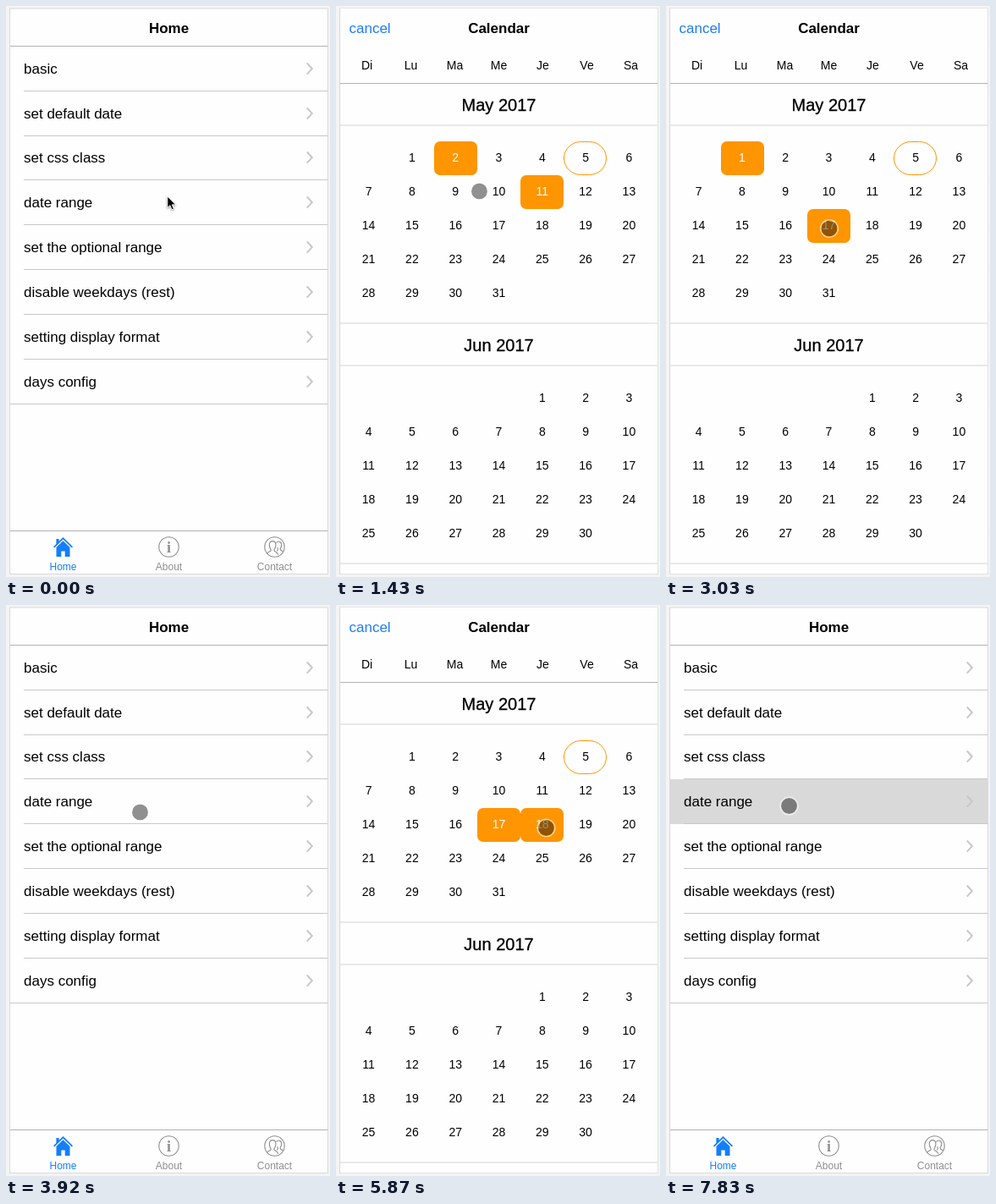
An HTML page for the animation above (8 s loop, 383 px wide and 675 px high).

```html
<!DOCTYPE html>
<html lang="en">
<head>
<meta charset="utf-8">
<title>Calendar range</title>
<style>
  html, body { margin: 0; width: 100%; height: 100%; overflow: hidden; background: #f4f4f4; }
  svg { display: block; width: 100%; height: 100%; font-family: "Liberation Sans", Arial, sans-serif; }
  .mid { text-anchor: middle; }
  .title { font-size: 17px; font-weight: bold; }
  .item, .cancel { font-size: 17px; }
  .cancel { fill: #1f7cf5; }
  .day { font-size: 14px; }
  .day rect { fill: none; }
  .on rect { fill: #ff9500; }
  .on text { fill: #fff; }
  .month { font-size: 20px; stroke: #000; stroke-width: .3; }
  .tab text { font-size: 12px; fill: #8e8e8e; }
  .tab .info { font: bold 18px "Liberation Serif", serif; }
  .tab path, .tab circle { fill: none; stroke: #8e8e8e; stroke-width: 1.1; }
  .tab.active text { fill: #147efb; }
  .tab.active path { fill: #147efb; stroke: none; }
  #arrow { stroke: #fff; filter: drop-shadow(0 1px 1px #0006); }
</style>
</head>
<body>
<svg viewBox="0 0 383 675">
  <defs><clipPath id="screen"><rect x="5" y="3" width="375.5" height="668.5"/></clipPath></defs>
  <rect x="4.5" y="3" width="376" height="668.5" fill="#fefefe" stroke="#d9d9d9"/>
  <g clip-path="url(#screen)">
    <g id="home"></g>
    <g id="modal"></g>
  </g>
  <path id="arrow" d="M190.8 225v13.6l3.1-2.9 2.2 5 2.3-1-2.1-4.8h4.3z"/>
  <g id="touch">
    <circle r="9.5" fill-opacity=".43"/>
    <circle r="10.3" fill="none" stroke="#fff" stroke-opacity=".55" stroke-width="1.6"/>
  </g>
</svg>
<script>
const $ = id => document.getElementById(id);
const show = (id, on) => $(id).style.display = on ? '' : 'none';
const text = (x, y, cls, s) => `<text x="${x}" y="${y}" class="${cls}">${s}</text>`;
const line = (x, y, color, w = 1) => `<path d="M${x} ${y}H380.5" stroke="${color}" stroke-width="${w}"/>`;
const divider = y => line(5, y, '#e2e2e2', 1.6);

// Home page
const items = ['basic', 'set default date', 'set css class', 'date range', 'set the optional range',
  'disable weekdays (rest)', 'setting display format', 'days config'];
const rows = items.map((s, i) => {
  const end = Math.ceil(47.25 + 52.9 * (i + 1));
  return text(21, end - 21, 'item', s) +
    `<path d="M355.8 ${end - 33.5}l6 6.6-6 6.6" fill="none" stroke="#c7c7cc" stroke-width="2"/>` +
    line(i < 7 ? 21 : 5, end - .5, '#c8c7cc');
}).join('');
const tab = (x, label, icon, cls = '') =>
  `<g class="tab ${cls}">${icon}${text(x, 667, 'mid', label)}</g>`;
const ring = x => `<circle cx="${x}" cy="639.5" r="11.7"/>`;
const house = '<path d="M67.5 628 79 639.2l-1.2 1.3-10.3-9.9-10.3 9.9-1.2-1.3 3.4-3.2v-6h3.2v2.8z' +
  'M67.5 632.3l8 7.6V651h-5.8v-6.5h-4.4V651h-5.8v-11.1z"/>';
const people = '<path d="M308.6 647c1.2-2 4.6-1.6 4.7-3.8-.3-1.2-2-2.6-2-5.9 0-6.2 7.6-6.2 7.6 0' +
  ' 0 3.3-1.7 4.7-2 5.9.1 2.2 3.9 1.8 5 5.4' +
  'M319.5 634.6c2-2.8 6.2-1.6 6.2 2.4 0 2.9-1.5 3.6-1.6 5 0 1.7 2.4 1.6 3.3 3.3M320.6 640.2l.8 2.2-1 2"/>';

$('home').innerHTML =
  text(192.5, 32, 'title mid', 'Home') + line(5, 47.5, '#b2b2b2') +
  '<rect id="press" x="5" y="206" width="375.5" height="53" fill="#d9d9d9"/>' + rows +
  line(5, 620.5, '#b2b2b2') +
  tab(67.5, 'Home', house, 'active') +
  tab(192.5, 'About', ring(192.5) + text(192.5, 645.5, 'mid info', 'i')) +
  tab(317.5, 'Contact', ring(317.5) + people);

// Calendar modal
const column = (i, pitch) => 192.5 + pitch * (i - 3);
function month(name, top, first, count) {
  let out = divider(top + 50) + text(192.5, top + 33, 'month mid', name);
  for (let d = 1; d <= count; d++) {
    const slot = d + first - 1, col = slot % 7, y = top + 69 + 40 * Math.floor(slot / 7);
    out += `<g class="day"><rect x="${14 + 51 * col}" y="${y}" width="51" height="40" rx="7"/>` +
      text(column(col, 51.3), y + 24, 'mid', d) + '</g>';
  }
  return `<g>${out}</g>` + divider(top + 284);
}
$('modal').innerHTML =
  '<rect x="5" y="3" width="375.5" height="668.5" fill="#fefefe"/>' +
  text(15.5, 32, 'cancel', 'cancel') + text(192.5, 32, 'title mid', 'Calendar') +
  ['Di', 'Lu', 'Ma', 'Me', 'Je', 'Ve', 'Sa'].map((s, i) => text(column(i, 52), 75, 'day mid', s)).join('') +
  line(5, 91.5, '#b2b2b2') + month('May 2017', 91, 1, 31) + month('Jun 2017', 375, 4, 30) +
  '<rect x="269.5" y="160.5" width="50" height="39" rx="20" fill="none" stroke="#ff9500"/>';
const mayDays = [...document.querySelectorAll('g.day')].slice(0, 31);

// Timeline
const LOOP = 8000, STEP = LOOP / 45;
const stops = [ // arrive, leave, x, y
  [0, 890, 192, 227], [1422, 1422, 169.5, 219], [1960, 2140, 91, 181], [2489, 2489, 167.5, 262],
  [2845, 3023, 193, 263], [3911, 3911, 158.5, 245], [4623, 4623, 157.5, 259.5], [5160, 5160, 185, 285],
  [5867, 6045, 248.5, 263.5], [6578, 6934, 191.5, 339.5], [7823, LOOP, 145.5, 237.5]];
const taps = [885, 4085, 7820];
const picks = [{ at: 2130, day: 1 }, { at: 3020, day: 17 }, { at: 5680, day: 18 }, { at: 6930, day: 31 }];

const clamp = p => Math.min(1, Math.max(0, p));
const easeOut = p => 1 - (1 - clamp(p)) ** 3;
const sum = (list, f) => list.reduce((s, v) => s + f(v), 0);

function pointer(t) {
  const i = stops.findLastIndex(s => s[0] <= t), [, leave, x, y] = stops[i];
  const [arrive, , nx, ny] = stops[i + 1] || stops[i];
  const p = t > leave ? (t - leave) / (arrive - leave) : 0;
  return [x + (nx - x) * p, y + (ny - y) * p];
}

function draw(now) {
  // Each picture is held for one step
  const t = Math.floor(now % LOOP / STEP) * STEP;
  $('touch').setAttribute('transform', `translate(${pointer(t)})`);
  show('touch', t > 0);
  show('arrow', t === 0);
  show('press', taps.some(a => t >= a && t < a + 215));

  // A tap opens the calendar; every second pick completes a range and closes it
  const closing = picks.filter((_, i) => i % 2);
  const open = sum(taps, a => easeOut((t - a - 110) / 400)) - sum(closing, c => easeOut((t - c.at - 130) / 300));
  show('modal', open > .001);
  $('modal').setAttribute('transform', `translate(0 ${(1 - open) * 668})`);

  // Picks replace the two ends of the range in turn
  const range = [2, 11];
  picks.forEach((p, i) => { if (t >= p.at) range[i % 2] = p.day; });
  mayDays.forEach((g, i) => g.classList.toggle('on', range.includes(i + 1)));
}

const start = performance.now();
function loop() {
  draw(performance.now() - start);
  requestAnimationFrame(loop);
}
loop();
</script>
</body>
</html>
```
